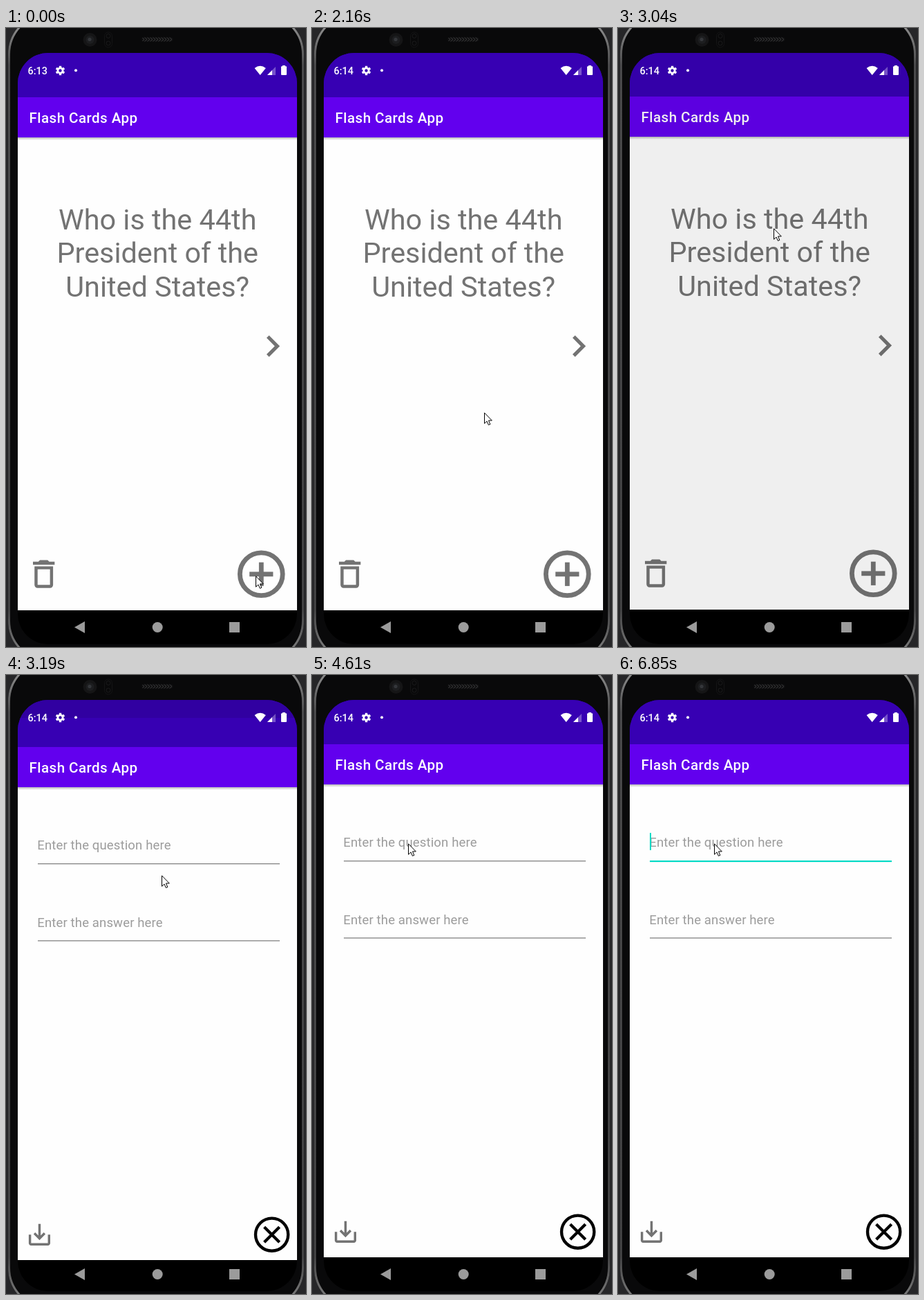
These frames come from a looping animation (434x894 px, 8000 ms). An HTML page with a canvas:

```html
<!DOCTYPE html>
<html lang="en">
<head>
<meta charset="utf-8">
<title>Flash Cards App</title>
<style>
  html, body { margin: 0; width: 100%; height: 100%; overflow: hidden; background: #202022; }
  canvas { display: block; width: 434px; height: 894px; }
</style>
</head>
<body>
<canvas id="stage"></canvas>
<script>
const W = 434, H = 894, LOOP = 8000;
const canvas = document.getElementById('stage');
const ratio = window.devicePixelRatio || 1;
canvas.width = Math.round(W * ratio);
canvas.height = Math.round(H * ratio);
const ctx = canvas.getContext('2d');

const GREY = '#737373', FAMILY = 'Roboto, sans-serif';
const ICONS = {
  chevron: new Path2D('M10 6L8.59 7.41 13.17 12l-4.58 4.59L10 18l6-6z'),
  trash: new Path2D('M6 19c0 1.1.9 2 2 2h8c1.1 0 2-.9 2-2V7H6v12zM8 9h8v10H8V9zm7.5-5l-1-1h-5l-1 1H5v2h14V4z'),
  save: new Path2D('M19 12v7H5v-7H3v7c0 1.1.9 2 2 2h14c1.1 0 2-.9 2-2v-7h-2zm-6 .67l2.59-2.58L17 11.5l-5 5-5-5 1.41-1.41L11 12.67V3h2z')
};
const POINTER = new Path2D('M.5.8V16.2L4 12.9 6.4 18.3 8.8 17.3 6.5 11.9H11.3Z');

// Pointer stops: start time, x, y
const STOPS = [
  [0, 361, 791], [500, 346, 751], [2160, 249, 555], [2440, 223, 298],
  [2590, 226, 291], [2740, 226, 289], [2890, 225, 289],
  [3910, 144, 246], [4610, 139, 243]
];
// Screen stages: start time, form shown, vertical shift, bottom and strength of dimming
const STAGES = [
  [0, false, 0, 36, 0], [3040, false, -1, 840, 0.06], [3190, true, 4, 62, 0.1],
  [3910, true, 1, 43, 0.1], [4610, true, 0, 36, 0]
];

const at = (list, t) => list.filter(row => row[0] <= t).pop();

function rect(x, y, w, h, fill) {
  ctx.fillStyle = fill;
  ctx.fillRect(x, y, w, h);
}

function round(x, y, w, h, r) {
  ctx.beginPath();
  ctx.roundRect(x, y, w, h, r);
}

function disc(x, y, r, fill) {
  ctx.beginPath();
  ctx.arc(x, y, r, 0, Math.PI * 2);
  ctx.fillStyle = fill;
  ctx.fill();
}

function ring(x, y, r, width, color) {
  ctx.beginPath();
  ctx.arc(x, y, r, 0, Math.PI * 2);
  ctx.lineWidth = width;
  ctx.strokeStyle = color;
  ctx.stroke();
}

function shape(points, fill) {
  ctx.beginPath();
  points.forEach(([x, y]) => ctx.lineTo(x, y));
  ctx.closePath();
  ctx.fillStyle = fill;
  ctx.fill();
}

function text(str, x, y, size, { weight = 400, color = GREY, align = 'left', spacing = 0 } = {}) {
  ctx.font = `${weight} ${size}px ${FAMILY}`;
  ctx.letterSpacing = spacing * size + 'px';
  ctx.textAlign = align;
  ctx.fillStyle = color;
  ctx.fillText(str, x, y);
  ctx.letterSpacing = '0px';
}

function icon(path, x, y, scale) {
  ctx.save();
  ctx.translate(x, y);
  ctx.scale(scale, scale);
  ctx.fillStyle = GREY;
  ctx.fill(path, 'evenodd');
  ctx.restore();
}

function drawPhone() {
  rect(0, 0, W, H, '#262628');
  round(3, -22, 428, 938, 60);
  ctx.fillStyle = '#09090a';
  ctx.fill();
  const rim = ctx.createLinearGradient(0, 0, 0, H);
  rim.addColorStop(0, '#8a8a8a');
  rim.addColorStop(0.06, '#4a4a4b');
  rim.addColorStop(0.94, '#424243');
  rim.addColorStop(1, '#777');
  round(4.5, -20.5, 425, 935, 58.5);
  ctx.strokeStyle = rim;
  ctx.lineWidth = 3;
  ctx.stroke();

  disc(121.5, 17, 10, '#151516');
  disc(121.5, 17, 6, '#1d1e20');
  disc(121, 16.5, 2.6, '#34363a');
  round(142.5, 6, 11, 22, 5.5);
  ctx.strokeStyle = '#141415';
  ctx.lineWidth = 1;
  ctx.stroke();
  ring(148, 11.5, 3, 1, '#1a1a1b');
  ring(148, 22, 3, 1, '#1a1a1b');

  ctx.save();
  round(196.5, 13.5, 45, 6, 3);
  ctx.fillStyle = '#101011';
  ctx.fill();
  ctx.clip();
  ctx.strokeStyle = '#3c3c3d';
  ctx.beginPath();
  for (let x = 192; x < 244; x += 4) {
    ctx.moveTo(x, 13);
    ctx.lineTo(x + 4, 16.5);
    ctx.lineTo(x, 20);
  }
  ctx.stroke();
  ctx.restore();
}

function drawStatus(t) {
  const white = '#fff';
  text(t < 2160 ? '6:13' : '6:14', 31.5, 67, 14.4, { weight: 500, color: white });

  for (let i = 0; i < 6; i++) {
    ctx.save();
    ctx.translate(78.5, 61.5);
    ctx.rotate(i * Math.PI / 3);
    rect(-1.7, -6.7, 3.4, 4, white);
    ctx.restore();
  }
  ring(78.5, 61.5, 3.6, 2.8, white);
  disc(101, 61.2, 2, white);

  ctx.beginPath();
  ctx.moveTo(367.7, 68);
  ctx.lineTo(359.6, 58);
  ctx.quadraticCurveTo(367.7, 51.6, 375.8, 58);
  ctx.fillStyle = white;
  ctx.fill();

  shape([[378, 68], [390, 56], [390, 68]], 'rgba(255,255,255,.32)');
  shape([[378, 68], [385, 61], [385, 68]], white);
  rect(400, 54, 4, 2, white);
  round(398, 55.3, 8, 12.7, 1);
  ctx.fillStyle = white;
  ctx.fill();
}

function drawBar() {
  rect(17, 30, 404, 70, '#3700b3');
  const shade = ctx.createLinearGradient(0, 158, 0, 162);
  shade.addColorStop(0, 'rgba(0,0,0,.28)');
  shade.addColorStop(1, 'rgba(0,0,0,0)');
  rect(17, 158, 404, 4, shade);
  rect(17, 100, 404, 58, '#6200ee');
  text('Flash Cards App', 33.5, 137.4, 20.57, { weight: 500, color: '#fff', spacing: 0.022 });
}

function drawCard() {
  ['Who is the 44th', 'President of the', 'United States?'].forEach((line, i) =>
    text(line, 219.2, 290.8 + i * 48.4, 41.4, { align: 'center' }));
  icon(ICONS.chevron, 354.8, 428.5, 2.58);
  icon(ICONS.trash, 27.8, 761.7, 2.24);
  ring(369.3, 788.8, 30.9, 6.8, GREY);
  rect(352.2, 785.4, 34.2, 6.8, GREY);
  rect(365.9, 771.7, 6.8, 34.2, GREY);
}

function drawField(hint, y, focused) {
  text(hint, 45.3, y, 18.52, { color: '#9c9c9c', spacing: 0.0075 });
  if (focused) rect(46, y + 19.5, 350, 2.2, '#03dac5');
  else rect(46, y + 19.6, 350, 1.3, '#838383');
}

function drawForm(t) {
  const focused = t >= 6170;
  drawField('Enter the question here', 248.4, focused);
  drawField('Enter the answer here', 359.6, false);
  if (focused && (t < 6590 || t >= 6850)) rect(46, 228, 2, 25, '#03dac5');

  icon(ICONS.save, 27.7, 783.6, 1.73);
  ring(384.6, 804.2, 23.6, 4.4, '#000');
  ctx.beginPath();
  ctx.moveTo(373.6, 793.2);
  ctx.lineTo(395.6, 815.2);
  ctx.moveTo(395.6, 793.2);
  ctx.lineTo(373.6, 815.2);
  ctx.lineWidth = 4.3;
  ctx.stroke();
}

function drawNav() {
  const tint = '#9b9b9b';
  shape([[99, 865.5], [114, 857], [114, 874]], tint);
  disc(219.2, 865.5, 7.5, tint);
  rect(323, 858, 15, 15, tint);
}

function drawScreen(t) {
  const [, form, shift, dimEnd, dim] = at(STAGES, t);
  ctx.save();
  round(17, 36, 404, 854, 44);
  ctx.clip();
  rect(17, 36, 404, 854, '#000');
  rect(17, 36, 404, 64, '#3700b3');

  ctx.save();
  ctx.translate(0, shift);
  rect(17, 100, 404, 741, '#fefefe');
  drawBar();
  form ? drawForm(t) : drawCard();
  ctx.restore();

  rect(17, 36, 404, dimEnd - 36, `rgba(0,0,0,${dim})`);
  drawStatus(t);
  drawNav();
  ctx.restore();
}

function drawPointer(t) {
  const [, x, y] = at(STOPS, t);
  ctx.save();
  ctx.translate(x, y);
  ctx.fillStyle = '#fff';
  ctx.fill(POINTER);
  ctx.strokeStyle = '#000';
  ctx.lineWidth = 1;
  ctx.stroke(POINTER);
  ctx.restore();
}

let start;
function frame(now) {
  if (start === undefined) start = now;
  const t = (now - start) % LOOP;
  ctx.setTransform(ratio, 0, 0, ratio, 0, 0);
  drawPhone();
  drawScreen(t);
  drawPointer(t);
  requestAnimationFrame(frame);
}
requestAnimationFrame(frame);
</script>
</body>
</html>
```
